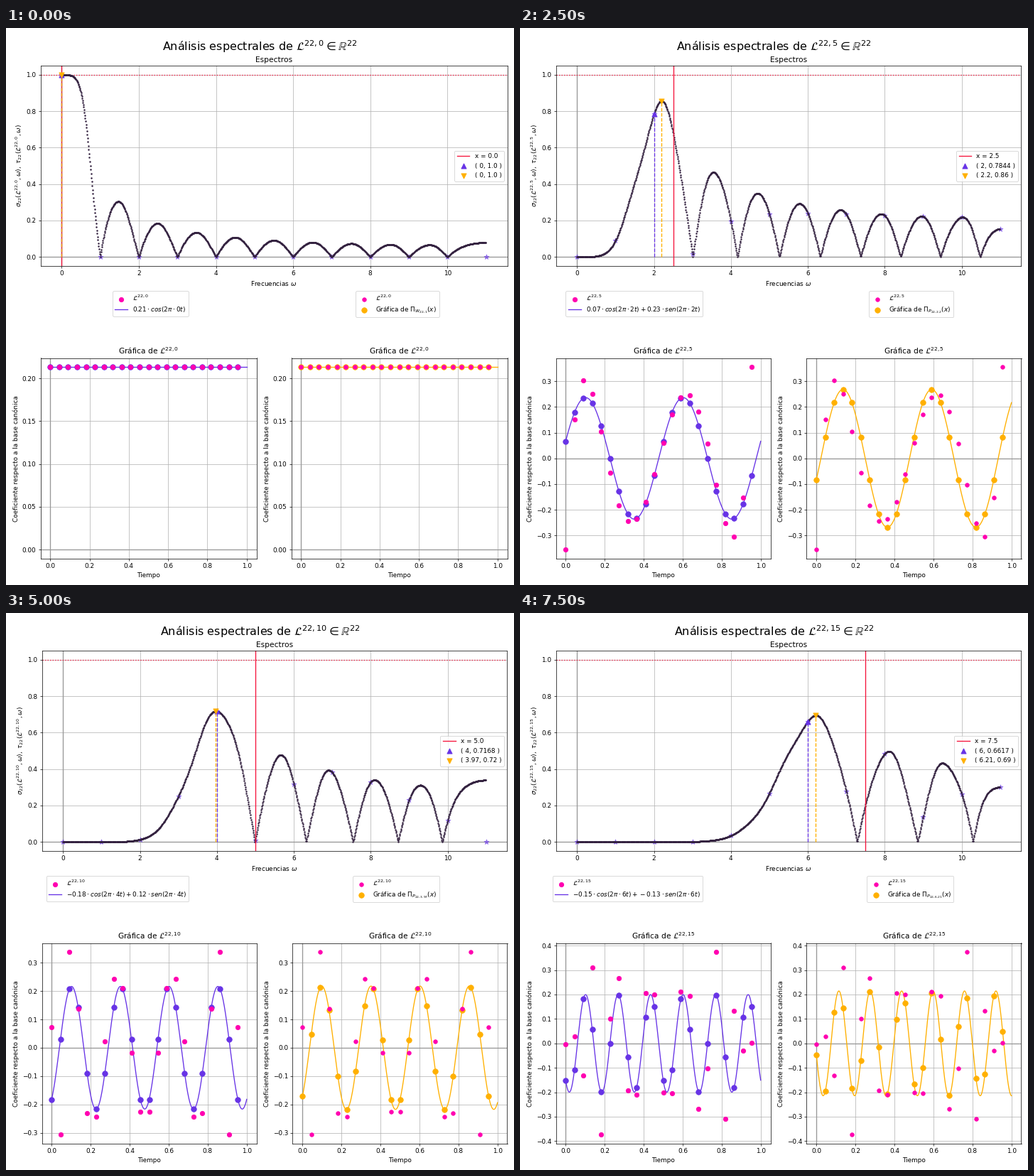
Animation, 715 px wide and 784 px high, one loop 8000 ms. Source, as a matplotlib script:

```python
import numpy as np
import matplotlib.pyplot as plt
from matplotlib.animation import FuncAnimation

W, H, DPI = 715, 784, 64
N, FRAMES = 22, 16
PINK, VIOLET, GOLD = "#ff00b0", "#6733e6", "#ffb000"
RED, DARK, GRAY = "#f5143c", "#33213f", "#999999"

plt.rcParams.update({"font.family": "DejaVu Sans", "font.size": 10})

j = np.arange(N)
t = j / N
fine = np.linspace(0, 1, 500)
freqs = np.arange(0, 11, 0.01)
ints = np.arange(N // 2 + 1)

# Orthonormal discrete Legendre basis, positive at the right end
basis = np.linalg.qr(np.polynomial.legendre.legvander(np.linspace(-1, 1, N), FRAMES - 1))[0]
basis *= np.sign(basis[-1])


def waves(w, x):
    """Columns cos and sin of frequency w; only cos where sin vanishes."""
    cols = [np.cos(2 * np.pi * w * x)]
    if w not in (0, N // 2):
        cols.append(np.sin(2 * np.pi * w * x))
    return np.stack(cols, axis=1)


def plane(w):
    return np.linalg.qr(waves(w, t))[0]


int_planes = [plane(w) for w in ints]
planes = [plane(w) for w in freqs]


def spectrum(spaces, v):
    return np.array([np.linalg.norm(q.T @ v) for q in spaces])


def fit(w, v):
    return np.linalg.lstsq(waves(w, t), v, rcond=None)[0]


fig = plt.figure(figsize=(W / DPI, H / DPI), dpi=DPI, facecolor="white")
top, left, right = (fig.add_axes([0, 0, 1, 1]) for _ in range(3))
head = fig.suptitle("", fontsize=18)


def place(ax, x0, y0, x1, y1):
    ax.set_position([x0 / W, 1 - y1 / H, (x1 - x0) / W, (y1 - y0) / H])


def reset(ax, title, xlabel, ylabel):
    ax.clear()
    ax.grid(True)
    ax.axhline(0, color=GRAY, lw=1.5)
    ax.axvline(0, color=GRAY, lw=1.5)
    ax.set_title(title, fontsize=12)
    ax.set_xlabel(xlabel)
    ax.set_ylabel(ylabel)


def draw_spectra(k, v, name):
    reset(top, "Espectros", r"Frecuencias $\omega$",
          rf"$\sigma_{{22}}({name}, \omega),\ \tau_{{22}}({name}, \omega)$")
    sigma, tau = spectrum(int_planes, v), spectrum(planes, v)
    a, b = sigma.argmax(), tau.argmax()
    top.axhline(1, color=RED, ls=":", lw=1.5)
    top.scatter(ints, sigma, s=65, marker="*", color=VIOLET, alpha=0.6, zorder=2.2)
    top.plot(freqs, tau, "o", ms=2.8, mew=0, color=DARK, zorder=2.3)
    top.axvline(k / 2, color=RED, lw=1.5, zorder=2.4, label=f"x = {k / 2}")
    peaks = [(ints[a], sigma[a], 4, VIOLET, "^"), (freqs[b], tau[b], 2, GOLD, "v")]
    for x, y, digits, color, marker in peaks:
        top.plot([x, x], [0, y], "--", color=color, lw=1.5, zorder=2.5)
        top.scatter([x], [y], s=65, marker=marker, color=color, zorder=3,
                    label=f"( {round(x, 2):g}, {round(y, digits)} )")
    top.set_xlim(-0.55, 11.55)
    top.set_ylim(-0.05, 1.05)
    top.legend(loc="center right")
    return ints[a], freqs[b]


def draw_fit(ax, v, w, name, color, size, curve_label=None, dot_label=None):
    reset(ax, rf"Gráfica de ${name}$", "Tiempo", "Coeficiente respecto a la base canónica")
    coef = fit(w, v)
    ax.scatter(t, v, s=size, color=PINK, zorder=4, label=f"${name}$")
    ax.plot(fine, waves(w, fine) @ coef, color=color, lw=1.5, label=curve_label)
    ax.scatter(t, waves(w, t) @ coef, s=70, color=color, zorder=3, label=dot_label)
    ax.set_xlim(-0.05, 1.05)
    ax.legend(loc="upper right", bbox_to_anchor=(0.7, 1.35))


def formula(w, coef):
    terms = [rf"{round(c, 2)}\cdot {fn}(2\pi\cdot {w}t)" for c, fn in zip(coef, ("cos", "sen"))]
    return f"${'+'.join(terms)}$"


def draw(k):
    v = basis[:, k]
    name = rf"\mathcal{{L}}^{{22,{k}}}"
    x0 = 48.5 if k == 0 else 50.5
    place(top, x0, 53, 705.5, 335)
    place(left, x0, 464.5, 352.5, 747)
    place(right, x0 + 353, 464.5, 705.5, 747)
    head.set_text(rf"Análisis espectrales de ${name} \in \mathbb{{R}}^{{22}}$")

    w_int, w_max = draw_spectra(k, v, name)
    space = "W_{22,1}" if w_max == 0 else f"P_{{22,{round(w_max, 2):g}}}"
    draw_fit(left, v, w_int, name, VIOLET, 50,
             curve_label=formula(w_int, fit(w_int, v)))
    draw_fit(right, v, w_max, name, GOLD, 38,
             dot_label=rf"Gráfica de $\Pi_{{{space}}}(x)$")
    return []


anim = FuncAnimation(fig, draw, frames=FRAMES, interval=500, repeat=True, repeat_delay=0)
plt.show()
```
